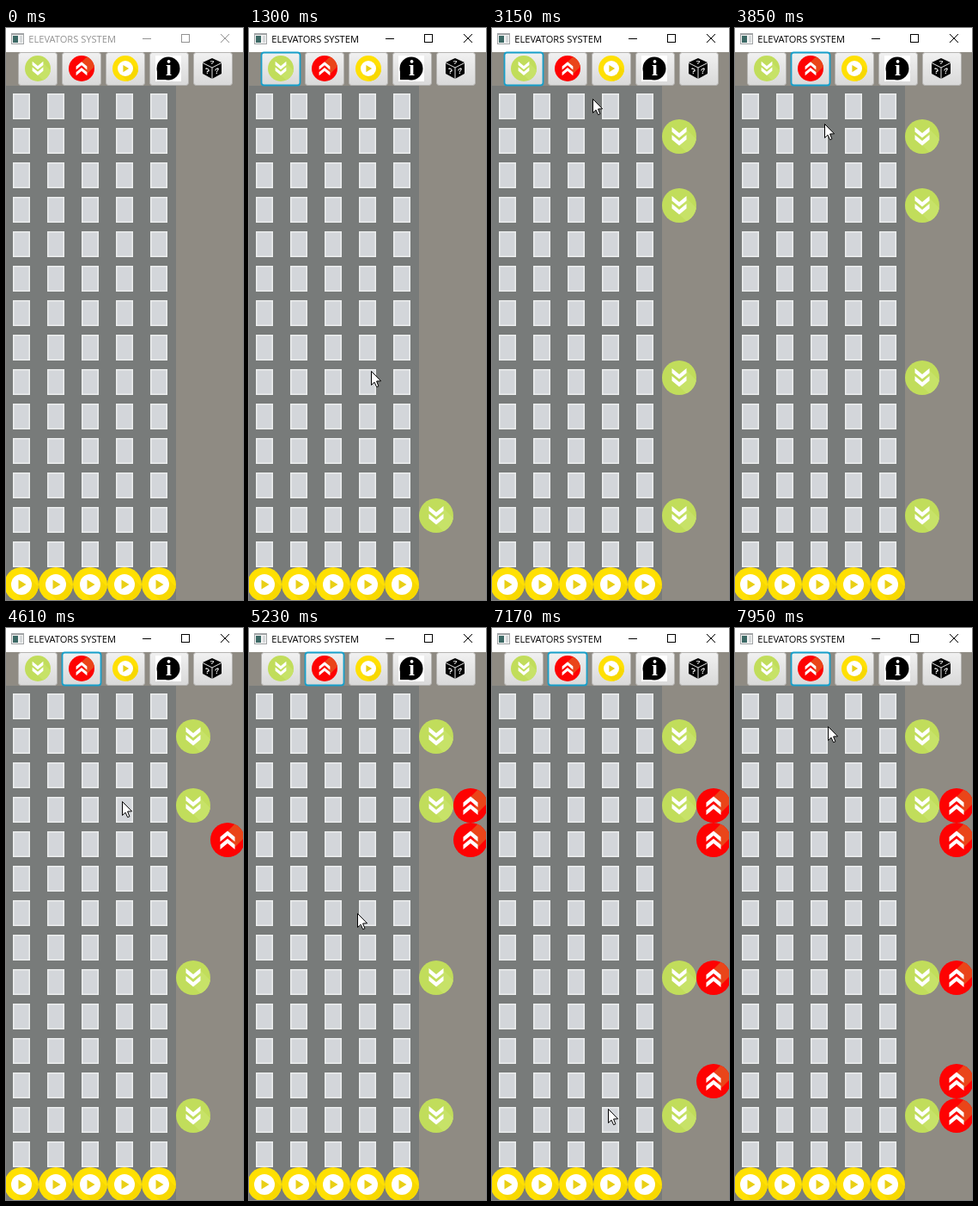
Animation of 276 by 664 pixels, one loop 8 s. Source, as an HTML page with a canvas:

```html
<!DOCTYPE html>
<html lang="en">
<head>
<meta charset="utf-8">
<title>Elevators</title>
<style>
html, body { margin: 0; width: 100%; height: 100%; overflow: hidden; background: #8f8b83; }
canvas { display: block; width: 276px; height: 664px; }
</style>
</head>
<body>
<canvas id="stage" width="276" height="664"></canvas>
<script>
const ctx = document.getElementById('stage').getContext('2d');
const LOOP = 8000, TICK = 77.1, LEAD = 16;
const STEP = 40, TOP = 76, BAR = 67;
const PRESS = 2, HOLD = 3;
const GREEN = '#c1dd5b', RED = '#fe0202', YELLOW = '#ffe003';

// Pointer stops: arrival tick, place, and whether it clicks there
const stop = (tick, x, y, click = true) => ({ tick, x, y, click });
const stops = [
  stop(1, 211, 485, false), stop(10, 130, 562), stop(17, 142, 398),
  stop(28, 131, 198), stop(36, 127, 118), stop(41, 117, 82, false),
  stop(44, 88, 46), stop(55, 138, 250), stop(60, 135, 201),
  stop(70, 124, 363, false), stop(72, 136, 400), stop(77, 126, 493, false),
  stop(79, 130, 525), stop(87, 141, 583, false), stop(93, 135, 558),
  stop(103, 108, 114, false)
];

function rect(x, y, w, h, color) {
  ctx.fillStyle = color;
  ctx.fillRect(x, y, w, h);
}

function disc(r, color) {
  ctx.fillStyle = color;
  ctx.beginPath();
  ctx.arc(0, 0, r, 0, Math.PI * 2);
  ctx.fill();
}

function poly(pts, fill, stroke) {
  ctx.beginPath();
  for (const [x, y] of pts) ctx.lineTo(x, y);
  ctx.closePath();
  if (fill) { ctx.fillStyle = fill; ctx.fill(); }
  if (stroke) { ctx.strokeStyle = stroke; ctx.stroke(); }
}

function lines(...runs) {
  ctx.beginPath();
  for (const [x, y, ...rest] of runs) {
    ctx.moveTo(x, y);
    for (let i = 0; i < rest.length; i += 2) ctx.lineTo(rest[i], rest[i + 1]);
  }
  ctx.stroke();
}

function at(x, y, scale, paint) {
  ctx.save();
  ctx.translate(x, y);
  ctx.scale(scale, scale);
  paint();
  ctx.restore();
}

// Disc with a diagonal shadow running from the segment a-b to the lower right
function shadedDisc(color, shade, [ax, ay], [bx, by]) {
  disc(20, color);
  ctx.save();
  ctx.clip();
  poly([[ax, ay], [ax + 40, ay + 40], [bx + 40, by + 40], [bx, by]], shade);
  ctx.restore();
}

function callIcon(x, y, scale, up) {
  at(x, y, scale, () => {
    if (up) ctx.scale(1, -1);
    shadedDisc(up ? RED : GREEN, up ? '#ea4519' : '#c7e268', [8, -9], [0, 10]);
    for (const d of [-11, -2])
      poly([[-8.5, d], [0, d + 7], [8.5, d], [8.5, d + 5.5], [0, d + 12.5], [-8.5, d + 5.5]], '#fff');
  });
}

function playIcon(x, y, scale) {
  at(x, y, scale, () => {
    shadedDisc(YELLOW, '#f7d800', [8.5, -8.5], [-8.5, 8.5]);
    disc(12, '#fff');
    poly([[-3.5, -5.5], [5.5, 0], [-3.5, 5.5]], '#e9cf16');
  });
}

function infoIcon(x, y) {
  at(x, y, 1, () => {
    rect(-15, -15, 30, 30, '#fff');
    disc(13.5, '#000');
    poly([[-13, 3], [-13, 13], [-2, 13]], '#000');
    ctx.fillStyle = '#fff';
    ctx.font = 'bold 25px "Liberation Serif", serif';
    ctx.textAlign = 'center';
    ctx.fillText('i', 0.5, 8);
  });
}

function diceIcon(x, y) {
  at(x, y, 1, () => {
    poly([[0, -12], [11, -7], [11, 6], [0, 12], [-11, 6], [-11, -7]], '#000');
    ctx.lineWidth = 1;
    ctx.strokeStyle = '#e6e6e6';
    lines([-11, -6.5, 0, -1, 11, -6.5], [0, -1, 0, 12]);
    ctx.fillStyle = '#fff';
    ctx.font = 'bold 9px "Liberation Sans", sans-serif';
    ctx.textAlign = 'center';
    for (const side of [-1, 1]) {
      ctx.save();
      ctx.transform(1, -0.45 * side, 0, 1, 5.5 * side, 6);
      ctx.fillText('?', 0, 0);
      ctx.restore();
    }
    ctx.scale(1, 0.6);
    ctx.fillText('?', 0, -8);
  });
}

function button(x, focused) {
  const g = ctx.createLinearGradient(0, 28, 0, 66);
  g.addColorStop(0, '#f1f1f1');
  g.addColorStop(1, '#d9d9d9');
  ctx.beginPath();
  ctx.roundRect(x + 0.5, 28.5, 45, 38, 3);
  ctx.fillStyle = g;
  ctx.fill();
  ctx.lineWidth = focused ? 1.8 : 1;
  ctx.strokeStyle = focused ? '#189fc9' : '#b4b3b0';
  ctx.stroke();
}

function titleBar(active) {
  const ink = active ? '#000' : '#929292';
  rect(0, 0, 276, 28, '#fff');
  rect(6, 6, 15, 13, '#a0a3a5');
  rect(7, 8, 13, 10, '#f4f4f4');
  rect(8, 9, 6, 8, '#3c6a66');
  rect(16, 9, 3, 8, '#d5d8da');
  ctx.fillStyle = ink;
  ctx.font = '11.1px "Open Sans", "Noto Sans", sans-serif';
  ctx.textAlign = 'left';
  ctx.fillText('ELEVATORS SYSTEM', 26.3, 17);
  ctx.strokeStyle = ink;
  ctx.lineWidth = 1;
  lines([159, 12.5, 169, 12.5], [250, 7, 260, 17], [260, 7, 250, 17]);
  ctx.strokeRect(204.5, 7.5, 9, 9);
}

function toolbar(focus) {
  const icons = [
    (x, y) => callIcon(x, y, 0.75, false),
    (x, y) => callIcon(x, y, 0.75, true),
    (x, y) => playIcon(x, y, 0.75),
    infoIcon,
    diceIcon
  ];
  icons.forEach((icon, i) => {
    button(14 + i * 51, i === focus);
    icon(37 + i * 51 - (i > 2 ? 1 : 0), 47);
  });
}

function building() {
  rect(0, BAR, 198, 597, '#787b7a');
  for (let col = 0; col < 5; col++) {
    const x = 8 + col * STEP;
    for (let row = 0; row < 14; row++) {
      const y = TOP + row * STEP;
      rect(x, y, 20, 30, '#eceeee');
      rect(x + 1.5, y + 1.5, 17, 27, '#d3d6da');
    }
    playIcon(x + 10, 646, 1);
  }
}

// Clicks on a floor place a call; a click on the toolbar switches to up calls
function replay(tick) {
  let focus = -1;
  const calls = [];
  for (const s of stops) {
    if (!s.click || tick < s.tick + PRESS) continue;
    if (s.y < BAR) { focus = 1; continue; }
    focus = Math.max(focus, 0);
    calls.push({ up: focus === 1, y: TOP + 10 + STEP * Math.floor((s.y - TOP) / STEP) });
  }
  return { focus, calls };
}

function pointer(tick) {
  if (tick < stops[0].tick) return;
  const i = stops.findLastIndex(s => s.tick <= tick);
  const a = stops[i], b = stops[i + 1] || a;
  const leave = a.tick + (a.click ? HOLD : 0);
  const u = Math.max(0, Math.min(1, (tick - leave) / (b.tick - leave || 1)));
  const e = u * u * (3 - 2 * u);
  const x = Math.round(a.x + (b.x - a.x) * e), y = Math.round(a.y + (b.y - a.y) * e);
  ctx.lineWidth = 1;
  at(x + 0.5, y + 0.5, 1, () => poly(
    [[0, 0], [0, 16], [3.6, 12.7], [6.1, 18.2], [8.4, 17.3], [6.1, 11.5], [11.1, 11.3]], '#fff', '#000'));
}

function draw(ms) {
  const tick = Math.floor((ms % LOOP + LEAD) / TICK);
  const { focus, calls } = replay(tick);
  rect(0, 0, 276, 664, '#8f8b83');
  titleBar(focus >= 0);
  building();
  toolbar(focus);
  for (const c of calls) callIcon(c.up ? 258 : 218, c.y, 1, c.up);
  pointer(tick);
}

const start = performance.now();
function loop(now) {
  draw(Math.max(0, now - start));
  requestAnimationFrame(loop);
}
draw(0);
requestAnimationFrame(loop);
</script>
</body>
</html>
```
